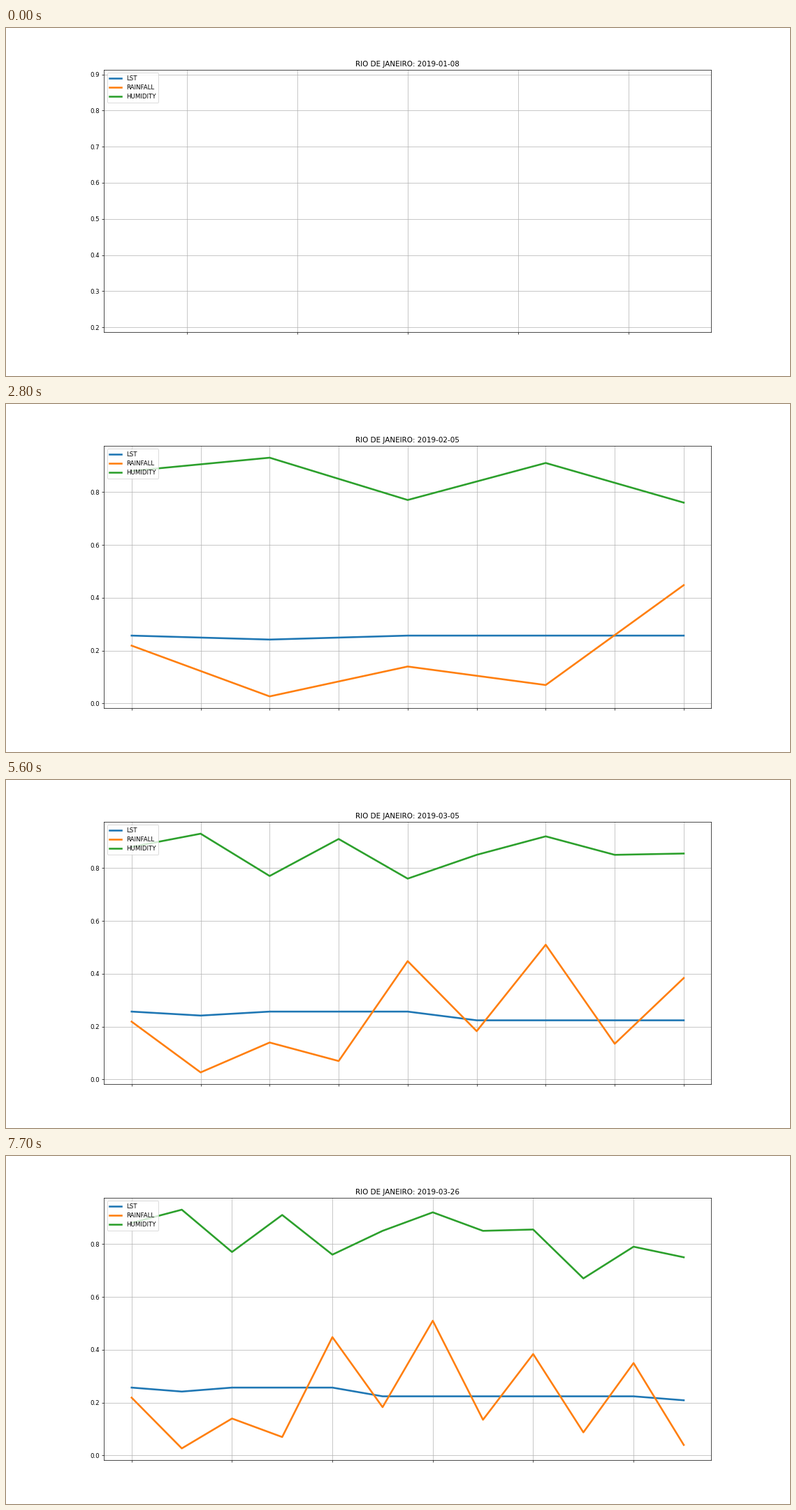
These frames come from a looping animation (1122x499 px, 8000 ms). A matplotlib script:

```python
import numpy as np
import matplotlib.pyplot as plt
from matplotlib.animation import FuncAnimation

WIDTH, HEIGHT = 1122, 499
DPI = WIDTH / 18
INTERVAL = 100        # ms per tick
TICKS_PER_WEEK = 7    # a new week every 700 ms
TICKS = 80
START = np.datetime64("2019-01-08")
WEEKS = np.arange((TICKS - 1) // TICKS_PER_WEEK + 1)


def zigzag(even, odd):
    """Alternate between two curves, each given by a few (week, value) points."""
    return np.where(WEEKS % 2 == 0,
                    np.interp(WEEKS, *zip(*even)),
                    np.interp(WEEKS, *zip(*odd)))


def temperature():
    """Two level stretches with a small dip every tenth week."""
    return np.where(WEEKS < 5, 0.257, 0.224) - 0.015 * (WEEKS % 10 == 1)


SERIES = {
    "LST": temperature(),
    "RAINFALL": zigzag(
        even=[(0, 0.219), (2, 0.14), (4, 0.448), (6, 0.51), (8, 0.384), (10, 0.35)],
        odd=[(1, 0.027), (3, 0.07), (5, 0.183), (11, 0.04)]),
    "HUMIDITY": zigzag(
        even=[(0, 0.88), (2, 0.77), (4, 0.76), (6, 0.92), (10, 0.79)],
        odd=[(1, 0.93), (3, 0.91), (5, 0.85), (7, 0.85), (9, 0.67), (11, 0.75)]),
}

plt.rcParams["font.family"] = "DejaVu Sans"

# The small surplus keeps rounding from dropping a pixel.
fig = plt.figure(figsize=((WIDTH + 1e-4) / DPI, (HEIGHT + 1e-4) / DPI), dpi=DPI)
fig.subplots_adjust(left=0.125, right=0.8997, bottom=0.1255, top=0.88)
ax = fig.add_subplot()


def draw(tick):
    shown = tick // TICKS_PER_WEEK + 1
    ax.clear()
    for name, values in SERIES.items():
        ax.plot(WEEKS[:shown], values[:shown], lw=3, label=name)
    ax.grid(True)
    ax.tick_params(labelbottom=False)
    ax.set_title(f"RIO DE JANEIRO: {START + 7 * (shown - 1)}")
    ax.legend(loc="upper left")


anim = FuncAnimation(fig, draw, frames=TICKS, init_func=lambda: draw(0),
                     interval=INTERVAL, repeat=True, repeat_delay=0)
plt.show()
```
